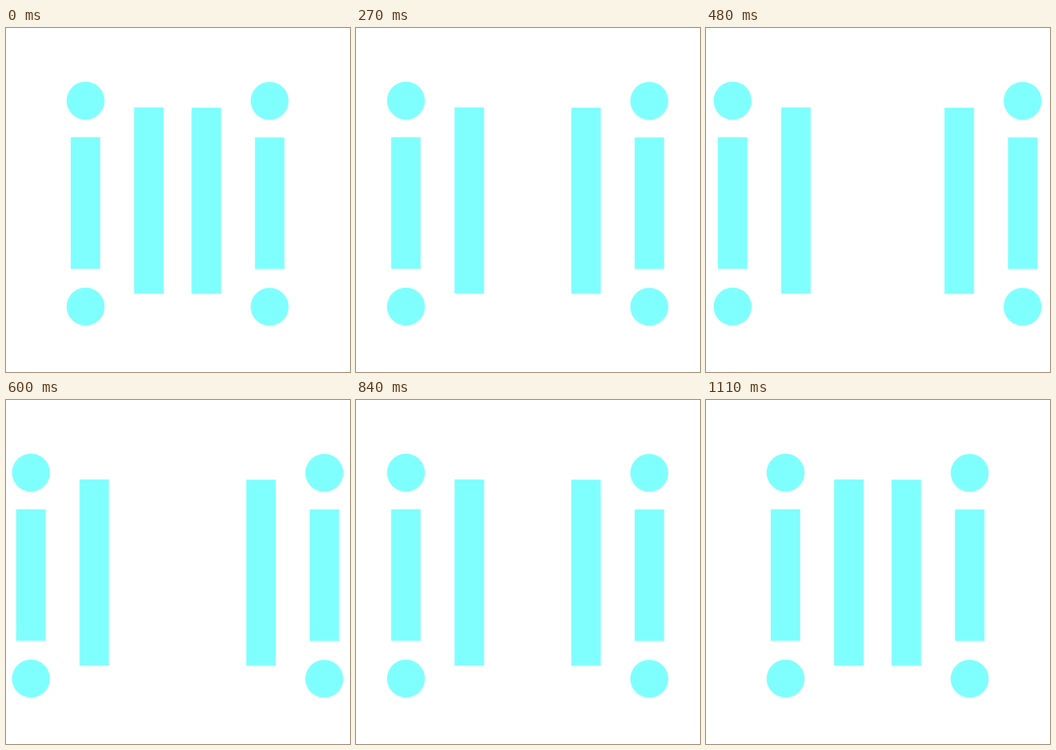
An HTML page without scripts that plays this animation: 748x748 px, repeating every 1140 ms.

```html
<!DOCTYPE html>
<html lang="en">
<head>
<meta charset="utf-8">
<title>Sliding bars and dots</title>
<style>
  html, body { margin: 0; width: 100%; height: 100%; overflow: hidden; background: #fff; }
  svg { display: block; width: 100%; height: 100%; fill: #80ffff; }

  /* Both halves slide outwards and back in 38 ticks of 30 ms. */
  .half { animation: slide 1140ms infinite; }
  .left { --early: -42.6px; }
  .right { --early: -28.5px; }

  @keyframes slide {
    0% { transform: translateX(0); animation-timing-function: steps(5); }
    13.15% { transform: translateX(var(--early)); animation-timing-function: steps(4); }
    23.68% { transform: translateX(-64.4px); animation-timing-function: steps(4); }
    34.21% { transform: translateX(-100.3px); animation-timing-function: steps(2); }
    39.47% { transform: translateX(-111.5px); animation-timing-function: steps(2); }
    44.73% { transform: translateX(-118.8px); animation-timing-function: steps(1); }
    47.36% { transform: translateX(-119.3px); animation-timing-function: steps(1); }
    52.63% { transform: translateX(-118.8px); animation-timing-function: steps(2); }
    57.89% { transform: translateX(-111.5px); animation-timing-function: steps(2); }
    63.15% { transform: translateX(-100.3px); animation-timing-function: steps(4); }
    73.68% { transform: translateX(-64.4px); animation-timing-function: steps(4); }
    84.21% { transform: translateX(var(--early)); animation-timing-function: steps(5); }
    97.36%, 100% { transform: translateX(0); }
  }
</style>
</head>
<body>
<svg viewBox="0 0 748 748">
  <defs>
    <g id="shapes">
      <circle cx="173" cy="158" r="41.3"/>
      <rect x="140.8" y="237.5" width="64" height="286"/>
      <circle cx="173" cy="605.7" r="41.3"/>
      <rect x="278.6" y="172.8" width="64" height="404.7"/>
    </g>
  </defs>
  <g class="half left"><use href="#shapes"/></g>
  <g transform="translate(746.3 .4) scale(-1 1)">
    <g class="half right"><use href="#shapes"/></g>
  </g>
</svg>
</body>
</html>
```
